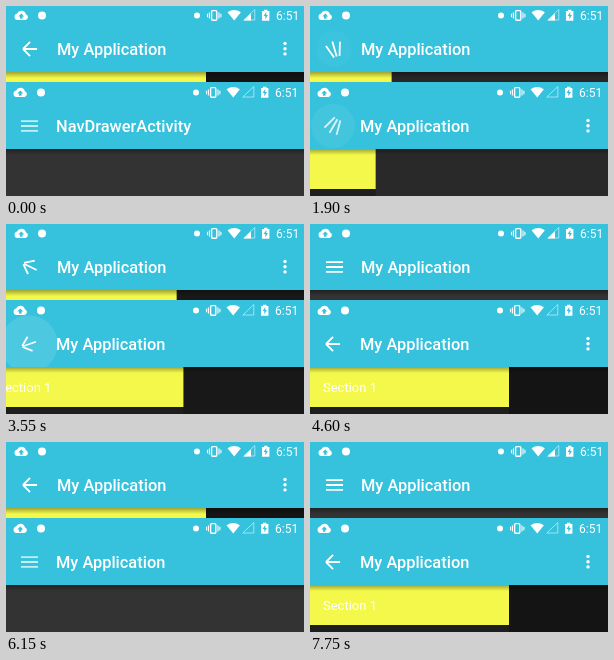
An HTML page for the animation above (8000 ms loop, 298 by 190 pixels).

```html
<!DOCTYPE html>
<html lang="en">
<head>
<meta charset="utf-8">
<title>Drawer toggles</title>
<style>
  html, body { margin: 0; width: 100%; height: 100%; overflow: hidden; background: #333; }
  svg { display: block; width: 298px; height: 190px; }
  text { font-family: Roboto, Arial, sans-serif; fill: #fff; }
  .title { font-size: 16.4px; font-weight: 500; }
  .clock { font-size: 12px; }
  .item { font-size: 13px; }
  .line { fill: none; stroke: #fff; }
</style>
</head>
<body>
<svg id="stage" viewBox="0 0 298 190" xmlns="http://www.w3.org/2000/svg">
  <defs>
    <linearGradient id="shade" x1="0" y1="0" x2="0" y2="1">
      <stop offset="0" stop-color="#000" stop-opacity=".34"/>
      <stop offset="1" stop-color="#000" stop-opacity="0"/>
    </linearGradient>
    <clipPath id="barClip"><rect y="-1" width="300" height="67"/></clipPath>
    <g id="status">
      <path fill="#fff" d="M11.5 14a3.3 3.3 0 0 1-.4-6.5a4.7 4.7 0 0 1 8.8 .7a3 3 0 0 1-.4 5.8z"/>
      <path fill="#36c1dc" d="M15.3 7.5l3 3h-1.8v2.3h-2.4v-2.3h-1.8z"/>
      <circle cx="36" cy="9.5" r="4" fill="#fff"/>
      <circle cx="191" cy="9.5" r="3" fill="#fff"/>
      <rect class="line" x="205.6" y="4.6" width="5.2" height="9.6" rx="1" stroke-width="1.4"/>
      <path class="line" d="M203.4 6.5v6M201.5 7.8v3.4M213 6.5v6M214.9 7.8v3.4" stroke-width="1.1"/>
      <path fill="#fff" d="M221.5 6.3q6.7-4.4 13.4 0l-6.7 8.2z"/>
      <path fill="#fff" d="M256 5h2v-1.3h3.4v1.3h2v9.7h-7.4z"/>
      <path fill="#36c1dc" d="M260.3 6l-2.7 4h1.7v3.2l2.7-4.2h-1.7z"/>
      <text class="clock" x="270" y="14">6:51</text>
    </g>
  </defs>
</svg>
<script>
const LOOP = 8000, SETTLE = 512, IDLE = 470, WIDTH = 200;
const clamp = v => Math.min(1, Math.max(0, v));
const mix = (a, b, p) => a + (b - a) * p;
const easeOut = t => 1 - (1 - clamp(t)) ** 5;

const stage = document.getElementById('stage');

function makeScreen(spec) {
  const g = document.createElementNS(stage.namespaceURI, 'g');
  g.setAttribute('transform', `translate(${spec.x} ${spec.y})`);
  g.innerHTML = `
    <rect y="-1" width="300" height="120" fill="#333"/>
    <rect class="scrim" y="60" width="300" height="60"/>
    <g class="drawer">
      <rect y="60" width="${WIDTH}" height="60" fill="#1e1e1e"/>
      <rect y="60" width="${WIDTH}" height="46" fill="#f3f84a"/>
      <text class="item" x="14" y="90.5">Section 1</text>
    </g>
    <rect y="66" width="300" height="6" fill="url(#shade)"/>
    <rect y="-1" width="300" height="67" fill="#36c1dc"/>
    <circle class="ripple" cx="24" cy="43" fill="#fff" clip-path="url(#barClip)"/>
    <use href="#status"/>
    <path d="${spec.signal}" fill="#fff"/>
    <path class="line" d="M237.8 14h11v-10.500z" stroke-width=".9" opacity=".6"/>
    <path class="line icon" stroke-width="1.8"/>
    <text class="title" x="51" y="48.5"></text>
    <g class="dots" fill="#fff">
      <circle cx="279" cy="37.500" r="1.7"/><circle cx="279" cy="42.700" r="1.7"/><circle cx="279" cy="47.900" r="1.7"/>
    </g>`;
  stage.append(g);
  const part = name => g.querySelector('.' + name);
  return { ...spec, scrim: part('scrim'), drawer: part('drawer'), ripple: part('ripple'),
           icon: part('icon'), title: part('title'), dots: part('dots') };
}

// Each tap toggles the drawer, beginning from `open`.
const screens = [
  { x: 0, y: 0, open: true, taps: [200, 1850, 3535, 5067, 6560],
    signal: 'M237.500 14.500h7.500v-7z', dim: 1, titleAt: 0 },
  { x: -1, y: 77, open: false, taps: [585, 1800, 3367, 4800, 6450],
    signal: '', dim: .72, titleAt: 1050 }
].map(makeScreen);

// Menu bars fold into a back arrow as p goes from 0 to 1.
function iconPath(p) {
  const mid = mix(17, 15, p), arm = mix(17, 10, p), cut = mix(0, .9, p);
  const turn = mix(0, Math.PI / 4, p), gap = mix(4.8, 0, p), edge = -mid / 2;
  const dx = arm * Math.cos(turn), dy = arm * Math.sin(turn);
  return `M${edge + cut} 0h${mid - 2 * cut}M${edge} ${gap}l${dx} ${dy}M${edge} ${-gap}l${dx} ${-dy}`;
}

function drawScreen(s, t) {
  const count = s.taps.filter(tap => tap <= t).length;
  const open = s.open !== (count % 2 === 1);
  const age = count ? t - s.taps[count - 1] : Infinity;
  const e = easeOut(age / SETTLE);
  const p = open ? e : 1 - e;

  s.scrim.setAttribute('opacity', .6 * p);
  s.drawer.setAttribute('transform', `translate(${WIDTH * (p - 1)} 0)`);

  const angle = (open ? -180 : 180) * (1 - p);
  s.icon.setAttribute('d', iconPath(p));
  s.icon.setAttribute('transform', `translate(24.500 43) rotate(${angle})`);
  s.icon.setAttribute('opacity', mix(s.dim, 1, p));

  s.ripple.setAttribute('r', mix(14, 30, clamp(age / 200)));
  s.ripple.setAttribute('opacity', .11 * clamp(age / 180) * clamp((750 - age) / 450));

  const menu = age >= IDLE ? open : !open;
  s.dots.setAttribute('visibility', menu ? 'visible' : 'hidden');
  const label = t < s.titleAt ? 'NavDrawerActivity' : 'My Application';
  if (s.title.textContent !== label) s.title.textContent = label;
}

const start = performance.now();
function frame() {
  const t = (performance.now() - start) % LOOP;
  screens.forEach(s => drawScreen(s, t));
  requestAnimationFrame(frame);
}
frame();
</script>
</body>
</html>
```
